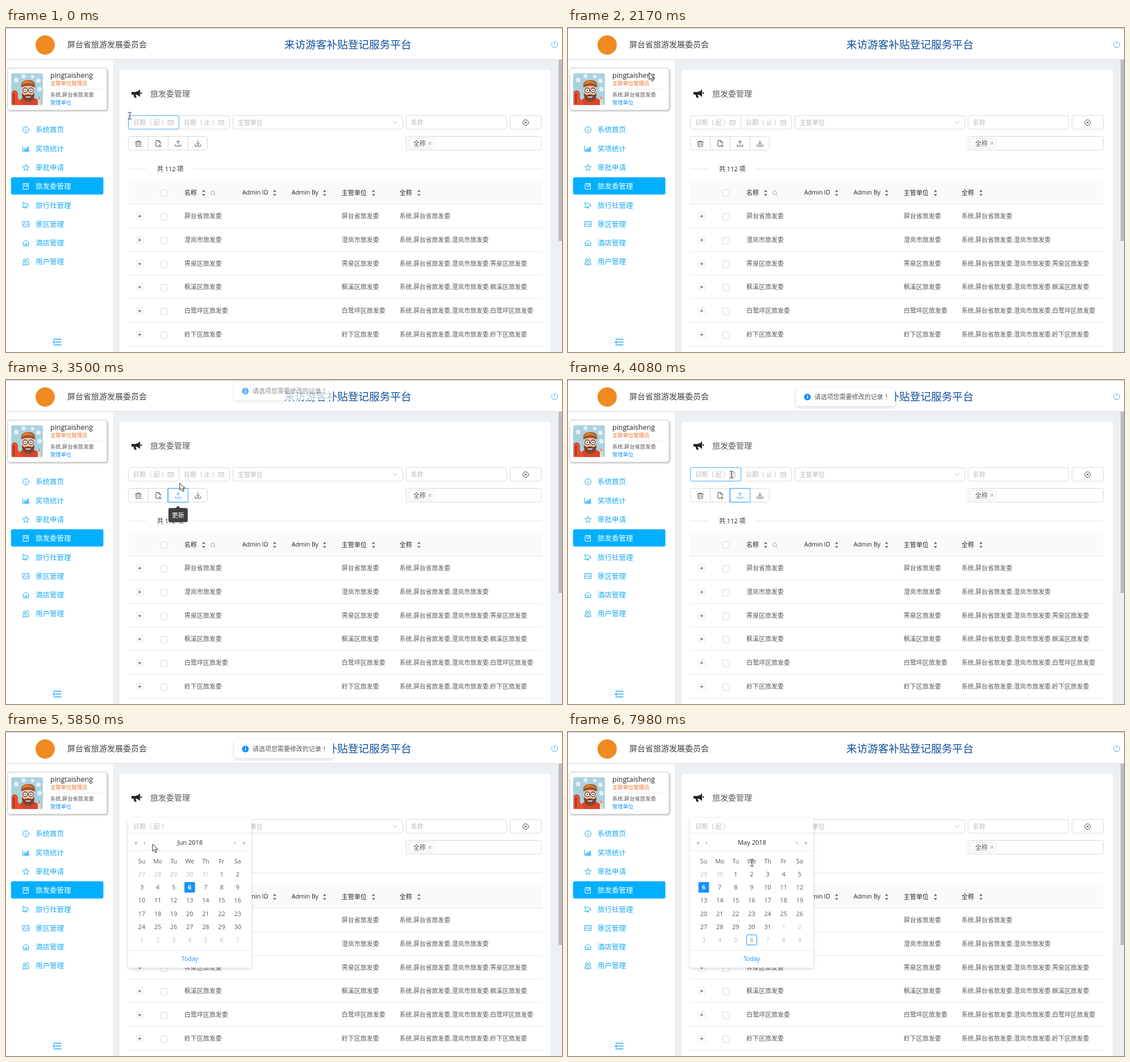
Recreate the animation shown at these times as an HTML page. Size 979 px wide and 572 px high, loop 8000 ms.

```html
<!DOCTYPE html>
<html lang="zh-CN">
<head>
<meta charset="utf-8">
<title>旅发委管理</title>
<style>
html, body { margin: 0; width: 100%; height: 100%; overflow: hidden; background: #fff; }
svg { display: block; font-family: "Open Sans", "Noto Sans CJK SC", "Noto Sans CJK", sans-serif; }
.path { font-family: Lato, "Noto Sans CJK SC", "Noto Sans CJK", sans-serif; }
.icon { fill: none; stroke-linejoin: round; stroke-linecap: round; }
.card { filter: drop-shadow(1px 1px 1.5px #0005); }
.float { filter: drop-shadow(0 2px 3.2px #00000028); }

#cursor, #beam, #arrow, #hand, #focus, #addHover, #ring, #addTip, #tip, #message, #popup, #june, #may {
  animation: 8s linear infinite;
}
#cursor { animation-name: move; }
#beam { animation-name: beam; }
#arrow { animation-name: arrow; }
#hand { animation-name: hand; }
#beam, #arrow, #hand, #june, #may { animation-timing-function: step-end; }
#focus { animation-name: focus; }
#addHover { animation-name: addHover; }
#ring { animation-name: ring; }
#addTip { animation-name: addTip; transform-origin: 268px 221px; }
#tip { animation-name: tip; transform-origin: 303px 221px; }
#message { animation-name: message; }
#popup { animation-name: popup; transform-origin: 215px 152px; }
#june { animation-name: june; }
#may { animation-name: may; }

@keyframes move {
  0%, 6.25% { transform: translate(218px, 155px); }
  9.5% { transform: translate(140px, 122px); }
  12% { transform: translate(60px, 90px); }
  14% { transform: translate(62px, 58px); }
  16% { transform: translate(110px, 60px); }
  17.75%, 18.3% { transform: translate(163px, 93px); }
  21% { transform: translate(120px, 146px); }
  24% { transform: translate(69px, 105px); }
  26.5%, 27.1% { transform: translate(142px, 78px); }
  31% { transform: translate(220px, 160px); }
  35.25%, 36% { transform: translate(279px, 194px); }
  37% { transform: translate(294px, 200px); }
  39%, 42.5% { transform: translate(303px, 203px); }
  43.75%, 44.5% { transform: translate(306px, 182px); }
  47% { transform: translate(292px, 170px); }
  48.75%, 62.6% { transform: translate(288px, 167px); }
  66% { transform: translate(322px, 196px); }
  68.5% { transform: translate(334px, 217px); }
  71% { transform: translate(285px, 208px); }
  73.1%, 73.9% { transform: translate(258px, 198px); }
  77%, 79.4% { transform: translate(244px, 196px); }
  83% { transform: translate(256px, 210px); }
  86.5% { transform: translate(262px, 214px); }
  88.9% { transform: translate(258px, 199px); }
  92.7%, 95% { transform: translate(244px, 196px); }
  99.75%, 100% { transform: translate(324px, 231px); }
}
@keyframes beam { 0% { opacity: 1 } 7% { opacity: 0 } 46.5% { opacity: 1 } 63.5% { opacity: 0 } 98.8%, 100% { opacity: 1 } }
@keyframes arrow {
  0% { opacity: 0 } 7% { opacity: 1 } 33.5% { opacity: 0 } 43.2% { opacity: 1 } 46.5% { opacity: 0 } 63.5% { opacity: 1 }
  75% { opacity: 0 } 80.5% { opacity: 1 } 91% { opacity: 0 } 96% { opacity: 1 } 98.8%, 100% { opacity: 0 }
}
@keyframes hand {
  0% { opacity: 0 } 33.5% { opacity: 1 } 43.2% { opacity: 0 } 75% { opacity: 1 }
  80.5% { opacity: 0 } 91% { opacity: 1 } 96%, 100% { opacity: 0 }
}
@keyframes focus { 0%, 6.5% { opacity: 1 } 9.5%, 46.5% { opacity: 0 } 48.7%, 100% { opacity: 1 } }
@keyframes addHover { 0%, 33.5% { opacity: 0 } 35%, 36% { opacity: 1 } 38%, 100% { opacity: 0 } }
@keyframes ring { 0%, 37.2% { opacity: 0 } 39%, 51% { opacity: 1 } 52%, 100% { opacity: 0 } }
@keyframes addTip {
  0%, 35.8% { opacity: 0; transform: scale(.8) } 36.6%, 37.2% { opacity: 1; transform: none }
  38.2%, 100% { opacity: 0; transform: scale(.8) }
}
@keyframes tip {
  0%, 38.2% { opacity: 0; transform: scale(.8) } 39.5%, 45% { opacity: 1; transform: none }
  47.5%, 100% { opacity: 0; transform: scale(.8) }
}
@keyframes message {
  0% { opacity: 0; transform: translateY(-33px) }
  43.25% { opacity: 0; transform: translateY(-33px); animation-timing-function: cubic-bezier(.08, .82, .17, 1) }
  47%  { opacity: 1; transform: none }
  80.9% { opacity: 1; transform: none; animation-timing-function: cubic-bezier(.6, .04, .98, .34) }
  84.6%, 100% { opacity: 0; transform: translateY(-6px) }
}
@keyframes popup {
  0% { opacity: 0; transform: scaleY(.8) }
  51.6% { opacity: 0; transform: scaleY(.8); animation-timing-function: cubic-bezier(.23, 1, .32, 1) }
  55%, 100% { opacity: 1; transform: none }
}
@keyframes june { 0% { opacity: 1 } 95.5%, 100% { opacity: 0 } }
@keyframes may { 0% { opacity: 0 } 95.5%, 100% { opacity: 1 } }
</style>
</head>
<body>
<svg id="stage" width="979" height="572" viewBox="0 0 979 572"></svg>
<script>
const BLUE = '#1890ff', SKY = '#1aaaf8', INK = '#595959', DARK = '#262626', HINT = '#b8b8b8', LINE = '#d9d9d9', RULE = '#e8e8e8';

// Text is placed by the middle of its line.
const text = (x, y, s, size = 11, fill = INK, attrs = '') =>
  `<text x="${x}" y="${y}" dy=".37em" font-size="${size}" fill="${fill}" ${attrs}>${s}</text>`;
const mid = (x, y, s, size, fill, attrs = '') => text(x, y, s, size, fill, `text-anchor="middle" ${attrs}`);
const rect = (x, y, w, h, fill, stroke = 'none', r = 0) =>
  `<rect x="${x}" y="${y}" width="${w}" height="${h}" rx="${r}" fill="${fill}" stroke="${stroke}"/>`;
const field = (x, y, w, h = 24, stroke = LINE, r = 3) => rect(x + .5, y + .5, w - 1, h, '#fff', stroke, r);
const hline = (x1, x2, y, color = RULE) => rect(x1, y, x2 - x1, 1, color);
const icon = (x, y, d, color = INK, width = 1) =>
  `<path class="icon" transform="translate(${x} ${y})" d="${d}" stroke="${color}" stroke-width="${width}"/>`;
const circle = (x, y, r, fill) => `<circle cx="${x}" cy="${y}" r="${r}" fill="${fill}"/>`;
const group = (id, body, cls = '') => `<g id="${id}" class="${cls}">${body}</g>`;

const shapes = {
  info: 'M5.5 0A5.5 5.5 0 1 1-5.5 0A5.5 5.5 0 1 1 5.5 0M0-3v.4M0-1v4',
  chart: 'M-5.5-4.5V5H6M-3.5 3V1L-1-1.5 1 .5 4.5-3.5V3ZM-2 2.5H4M-1 1H4M3-.5h1',
  star: 'M0-5.5 1.7-1.9 5.6-1.5 2.7 1.2 3.5 5 0 3.1-3.5 5-2.7 1.2-5.6-1.5-1.7-1.9Z',
  book: 'M-4.5-5h9V5h-9ZM-2-5V0H2.5V-5M1-3v1',
  horn: 'M-5.5-4.5 5-1.5V1.5L-5.5 4.5-4 0ZM-2 3.5v1.5h3V2.5',
  picture: 'M-5.5-4.5h11v9h-11ZM-5.5 2-2-1 1 2 3 0 5.5 2M-3-2.5h1M1-2h2',
  home: 'M-6 .5 0-5 6 .5M-4.5-.5V5h9V-.5M-1.5 5V1.5h3V5',
  users: 'M-.5-3A2 2 0 1 1-4.5-3A2 2 0 1 1-.5-3M4.5-3A2 2 0 1 1 .7-3A2 2 0 1 1 4.5-3M-5 5V2Q-5 0-2.5 0T0 2V5ZM0 5H5V2Q5 0 2.5 0',
  trash: 'M-5-3H5M-1.5-3v-1.5h3V-3M-4-3V5H4V-3M-1.5-.5v3M1.5-.5v3',
  addFile: 'M0 5H-4V-5.5H1L4-2.5V0M1-5.5v3H4M3 1.5v5M.5 4h5',
  upload: 'M-5 2V4.5H5V2M0 2V-5M-2.5-2.5 0-5 2.5-2.5',
  download: 'M-5 2V4.5H5V2M0-5V2M-2.5-.5 0 2 2.5-.5',
  calendar: 'M-4.5-3.5h9v7.5h-9ZM-4.5-1h9M-2-5v2M2-5v2M-2 1.5h4',
  cross: 'M-2-2 2 2M2-2-2 2',
};

const avatar = `<svg x="9" y="80" width="56" height="56" viewBox="0 0 56 56">
  ${rect(0, 0, 56, 56, '#a9d2e0', 'none', 3)}
  ${[[9, 12, 4], [22, 5, 3.5], [38, 6, 3], [48, 13, 4], [50, 28, 4]].map(([x, y, r]) => circle(x, y, r, '#e4f1f5')).join('')}
  <path d="M14 56Q14 45 21 43H38Q50 45 52 56Z" fill="#d8442c"/>
  <path d="M1 36Q1 30 6 30T12 36V44L18 50V56H1Z" fill="#e2502f"/>
  <path d="M5 36v17" stroke="#8d2c23" stroke-width="2"/>
  ${rect(47, 46, 5, 10, '#e9d8c4')}${rect(48.5, 41, 2, 5, '#e98438')}
  <ellipse cx="30" cy="31" rx="11" ry="14" fill="#f3c09f"/>
  <path d="M19 33Q18 50 30 50T41 33Q39 39 35 38Q30 36 25 38Q21 39 19 33Z" fill="#7d4430"/>
  <path d="M26 41q4 2.5 8 0" stroke="#f8e3d4" stroke-width="2" fill="none"/>
  <path d="M18 25Q16 12 30 12T42 25Q30 19 18 25Z" fill="#9a5330"/>
  <path d="M19 20Q21 11 30 13T41 20Q30 15 19 20Z" fill="#e57a2b"/>
  <g fill="#fff" stroke="#4a3532" stroke-width="1.3"><circle cx="25" cy="30" r="4"/><circle cx="35" cy="30" r="4"/></g>
  ${circle(25, 30, 1.2, '#333')}${circle(35, 30, 1.2, '#333')}
</svg>`;

const header = () => rect(0, 0, 979, 56, '#fff') + rect(0, 0, 979, 1.5, '#d0d0df') + hline(0, 979, 55, '#dadce0')
  + circle(69, 30, 17, '#ef8a20')
  + text(108, 29, '屏台省旅游发展委员会', 14, '#404040')
  + text(490, 29, '来访游客补贴登记服务平台', 18.67, '#124f9c')
  + icon(966, 29, 'M-3-4.5A5.5 5.5 0 1 0 3-4.5M0-6V-.5', '#4ba5ea');

const menu = [['info', '系统首页'], ['chart', '奖项统计'], ['star', '审批申请'], ['book', '旅发委管理'],
  ['horn', '旅行社管理'], ['picture', '景区管理'], ['home', '酒店管理'], ['users', '用户管理']];
const sidebar = () => rect(0, 56, 188, 516, '#fff')
  + `<g class="card">${rect(3, 71, 175, 74, '#fff', '#d4d4d4', 4)}</g>` + avatar
  + text(78, 83, 'pingtaisheng', 12.5, DARK)
  + text(78, 97.5, '主管单位管理员', 9.33, '#f5692a')
  + hline(78, 172, 107, '#eee')
  + text(78, 118, '系统.屏台省旅发委', 9.33, INK, 'class="path"')
  + text(78, 132, '管理单位', 9.33, BLUE)
  + menu.map(([shape, label], i) => {
    const y = 179.7 + i * 33.3, active = i === 3, color = active ? '#fff' : SKY;
    return (active ? rect(9, 263.5, 162.5, 30.5, '#00b0ff', 'none', 3) : '') + icon(35, y, shapes[shape], color) + text(52, y, label, 12.5, color);
  }).join('')
  + icon(90, 554.5, 'M-6-5H7M-2 0H7M-6 5H7M-7 0l2.5-2v4Z', SKY, 1.3);

const dateField = (x, label) => field(x, 154, 90) + text(x + 9, 167, label, 11, HINT) + icon(x + 75, 167, shapes.calendar, '#c4c4c4');
const button = (x, shape) => icon(x, 204, shapes[shape], '#505050');
const filters = () => dateField(215, '日期（ 起 ）') + dateField(304, '日期（ 止 ）')
  + group('focus', rect(215.5, 154.5, 89, 24, 'none', '#40a9ff', 3))
  + field(399, 154, 300) + text(408, 167, '主管单位', 11, HINT) + icon(685, 167, 'M-3.5-2 0 2 3.5-2', '#bbb')
  + field(704, 154, 178) + text(713, 167, '名称', 11, HINT)
  + field(887, 154, 56) + icon(915, 167, 'M5 0A5 5 0 1 1-5 0A5 5 0 1 1 5 0M-2-2 2 2M2-2-2 2', '#505050')
  + field(215, 191, 140)
  + [250, 285, 320].map(x => rect(x, 191, 1, 25, LINE)).join('')
  + button(233, 'trash') + button(268, 'addFile') + button(303, 'upload') + button(338, 'download')
  + group('addHover', icon(268, 204, shapes.addFile, '#40a9ff'))
  + group('ring', rect(284.5, 191, 36, 25, '#fff', '#8ec8fb', 1) + rect(285.5, 191.5, 35, 24, '#fff', '#40a9ff') + icon(303, 204, shapes.upload, '#40a9ff'))
  + field(704, 191, 239) + field(708, 194, 47, 18, RULE) + rect(709, 195, 45, 17, '#fafafa')
  + text(717, 203.5, '全称', 11) + icon(746.5, 203.5, shapes.cross, '#888');

const province = '屏台省旅发委', city = '澄岚市旅发委';
const rows = [province, city, ...['霁泉区', '枫溪区', '白鹭坪区', '岭下区'].map(d => d + '旅发委')];
const chain = name => ['系统', ...new Set(name === province ? [name] : [province, city, name])].join('.');
const sorter = x => `<path d="M${x - 3} 289.5l3-4 3 4ZM${x - 3} 293l3 4 3-4Z" fill="#777"/>`;
const checkbox = y => rect(272.5, y - 5.5, 11.5, 11.5, '#fff', LINE, 1.5);

const table = () => hline(215, 247, 248) + hline(331, 943, 248) + text(266, 248.5, '共 112 项', 11, DARK)
  + rect(215, 270, 728, 40, '#fafafa') + hline(215, 943, 310) + checkbox(291)
  + text(314, 290.5, '名称', 11, DARK) + text(416, 290.5, 'Admin ID', 10.6, DARK) + text(503, 290.5, 'Admin By', 10.6, DARK)
  + text(591, 290.5, '主管单位', 11, DARK) + text(693, 290.5, '全称', 11, DARK)
  + [348, 473, 561, 647, 727].map(sorter).join('')
  + icon(364.5, 291.5, 'M3-.5A3.5 3.5 0 1 1-4-.5A3.5 3.5 0 1 1 3-.5M2 2 4.5 4.5', '#aaa')
  + rows.map((name, i) => {
    const y = 332 + i * 41.8, snapped = Math.round(y);
    return rect(229.5, snapped - 5.5, 11.5, 11.5, '#fff', RULE) + icon(235.3, snapped + .3, 'M-2.5 0h5M0-2.5v5', INK)
      + checkbox(snapped + 1) + text(314, y, name) + text(591, y, name)
      + text(693, y, chain(name), 10.85, INK, 'class="path"') + hline(215, 943, Math.round(y + 20));
  }).join('');

const content = () => rect(188, 56, 791, 516, '#ecf0f3') + rect(200, 74, 759, 498, '#fff')
  + rect(973, 56, 6, 320, '#b9bbbd')
  + '<path transform="translate(221 108)" fill="#222" d="M0 5H7Q12 4 15 0V14Q12 10 7 9.5L9 15H5L3.5 9.5H0ZM16 5q2 0 2 2t-2 2Z"/>'
  + text(254, 116, '旅发委管理', 14, INK) + filters() + table();

const column = i => 239 + i * 28.15, line = i => 251 + i * 23.2;
const month = (id, title, lead, before, length, today) => {
  const cells = Array.from({ length: 42 }, (_, i) => {
    const day = i - lead + 1, x = column(i % 7), y = line(Math.floor(i / 7));
    const inside = day > 0 && day <= length, picked = day === 6, marked = i === today && !picked;
    const label = day < 1 ? before + day : inside ? day : day - length;
    return (picked ? rect(x - 9.3, y - 9.3, 18.6, 18.6, BLUE, 'none', 1.5) : '')
      + (marked ? rect(x - 9, y - 9, 18, 18, 'none', BLUE, 1.5) : '')
      + mid(x, y, label, 10.8, picked ? '#fff' : inside ? INK : '#bfbfbf', picked || marked ? 'font-weight="700"' : '');
  });
  return group(id, mid(324, 195, title, 11, DARK) + cells.join(''));
};
const popup = () => group('popup', `<g class="float">${rect(215, 152, 217, 264, '#fff', 'none', 3)}</g>`
  + text(224, 167, '日期（ 起 ）', 11, HINT)
  + [178, 209, 385].map(y => hline(215, 432, y)).join('')
  + [[229, '«'], [244, '‹'], [403, '›'], [419, '»']].map(([x, s]) => mid(x, 194.5, s, 11, '#888')).join('')
  + ['Su', 'Mo', 'Tu', 'We', 'Th', 'Fr', 'Sa'].map((d, i) => mid(column(i), 228, d, 10.6, INK)).join('')
  + month('june', 'Jun 2018', 5, 31, 30, 10) + month('may', 'May 2018', 2, 30, 31, 38)
  + mid(323.5, 400.5, 'Today', 10.6, BLUE));

const tooltip = (id, x, label) => group(id, `<path d="M${x - 4} 226l4-4 4 4Z" fill="#404040"/>`
  + rect(x - 17, 226, 34, 25, '#404040', 'none', 3) + mid(x, 238.5, label, 11, '#fff'));
const message = () => group('message', rect(402, 14, 174, 32, '#fff', 'none', 3)
  + circle(421.5, 30, 6, BLUE) + mid(421.5, 30, 'i', 9, '#fff', 'font-weight="700"')
  + text(434, 30, '请选项您需要修改的记录 ！'), 'float');

const cursor = () => group('cursor',
  group('beam', icon(0, 0, 'M-3-6h2l1 1 1-1h2M0-5V5M-3 6h2l1-1 1 1h2', '#333'))
  + group('arrow', '<path d="M0 0V12.5L3 9.8 5.2 15 7.5 14 5.3 9H9.2Z" fill="#fff" stroke="#222"/>')
  + group('hand', '<path d="M-1.5 9V0Q0-2.5 1.5 0V5.5Q3 4 4 6Q5.5 5 6.5 6.7Q8.5 6 8.5 8.5V13L7 17.5H-1L-5.5 11Q-6 8-3.5 9L-1.5 11Z" fill="#fff" stroke="#222"/><path d="M1.5 6v3M4 6.5v3M6.5 7v2.5" stroke="#222" stroke-width=".8"/>'));

document.getElementById('stage').innerHTML = content() + sidebar() + header()
  + tooltip('addTip', 268, '新增') + tooltip('tip', 303, '更新') + popup() + message() + cursor();
</script>
</body>
</html>
```
